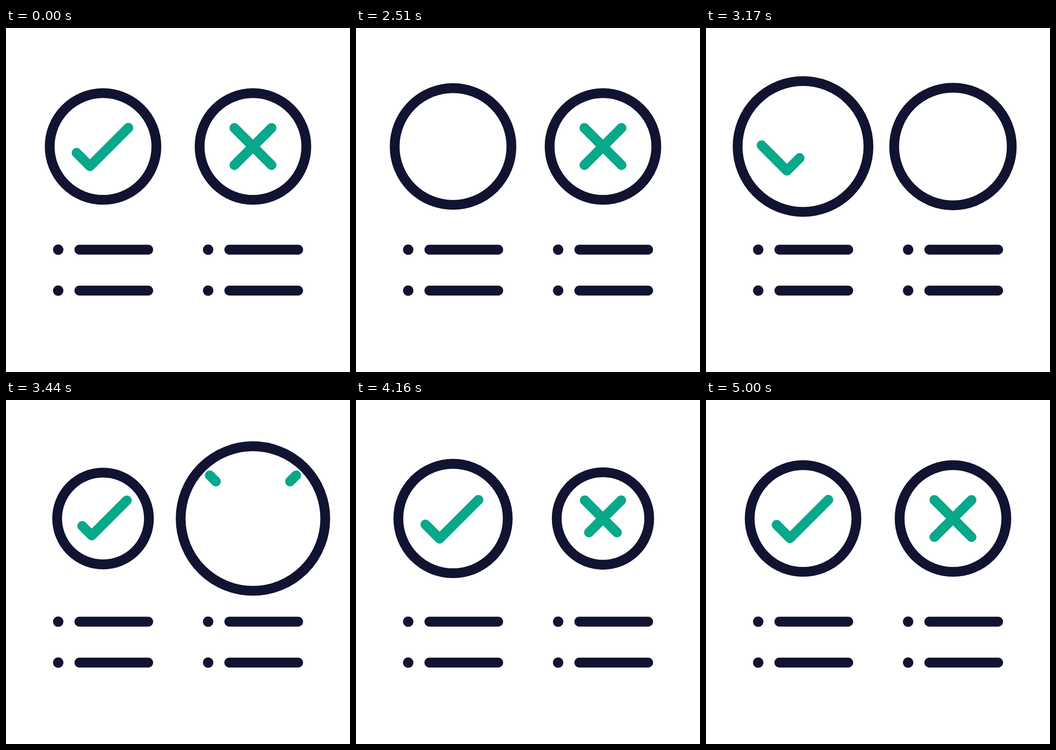
An HTML page with a canvas for the animation above (5030 ms loop, 748 by 748 pixels).

```html
<!DOCTYPE html>
<html>
<head>
<meta charset="utf-8">
<style>
html, body { margin: 0; width: 100%; height: 100%; overflow: hidden; background: #fff; }
canvas { display: block; }
</style>
</head>
<body>
<canvas id="stage" width="748" height="748"></canvas>
<script>
const ctx = document.getElementById('stage').getContext('2d');
const NAVY = '#121331', GREEN = '#08a88a';
const LOOP = 5030, START = 2000, STEP = 30;
const CY = 257.7, RADIUS = 116, ERASE = 335, ENTER = 735;

// Each icon: centre x, delay, scale peaks, mark length, overhang at both ends, last swing, strokes
const icons = [
  { x: 211, delay: 0, peak: 1.448, bounce: 1.065, len: 112.5, over: 16, swing: -3.2,
    strokes: [[[-73.5, -2.2], [-28.5, 42.8], [71.1, -56.8]]] },
  { x: 537, delay: 635, peak: 1.396, bounce: 1.073, len: 80.6, over: 29, swing: -8,
    strokes: [[[-69.3, 69.3], [69.3, -69.3]], [[69.3, 69.3], [-69.3, -69.3]]] }
];

// Keys are [time, value, bias]; sine easing between neighbours
function ease(keys, t) {
  if (t <= keys[0][0]) return keys[0][1];
  for (let i = 1; i < keys.length; i++) {
    const [t0, v0] = keys[i - 1], [t1, v1, bias = 1] = keys[i];
    if (t < t1) {
      const u = ((t - t0) / (t1 - t0)) ** bias;
      return v0 + (v1 - v0) * Math.sin(u * Math.PI / 2) ** 2;
    }
  }
  return keys[keys.length - 1][1];
}

function stroke(points, color) {
  ctx.strokeStyle = color;
  ctx.beginPath();
  points.forEach(([x, y]) => ctx.lineTo(x, y));
  ctx.stroke();
}

function dot(x, y) {
  ctx.fillStyle = NAVY;
  ctx.beginPath();
  ctx.arc(x, y, 11.3, 0, 7);
  ctx.fill();
}

// Visible part of the mark along its path, 0..len when at rest
function markSpan({ len, over, swing }, t) {
  if (t < ENTER) return [0, len * (1 - Math.max(t, 0) / ERASE)];
  const shift = ease([[ENTER, len + over], [1190, -62], [1460, 6], [1900, swing], [2330, 0]], t);
  return [Math.max(shift, -over), Math.min(shift + len, len + over)];
}

function drawIcon(icon, time) {
  const t = time - icon.delay;
  const s = ease([[0, 1], [250, 0.8], [960, icon.peak, 0.75], [1460, 0.858],
    [1960, icon.bounce], [2310, 1]], t);
  const [from, to] = markSpan(icon, t);

  ctx.save();
  ctx.translate(icon.x, CY);
  if (to > from) {
    const unit = s * Math.SQRT2;
    ctx.setLineDash([(to - from) * unit, 9999]);
    ctx.lineDashOffset = -(from + icon.over) * unit;
    for (const path of icon.strokes) stroke(path.map(([x, y]) => [x * s, y * s]), GREEN);
    ctx.setLineDash([]);
  }
  ctx.strokeStyle = NAVY;
  ctx.beginPath();
  ctx.arc(0, 0, RADIUS * s, 0, 7);
  ctx.stroke();
  ctx.restore();

  for (const y of [482, 571]) {
    dot(icon.x - 97.5, y);
    stroke([[icon.x - 51.5, y], [icon.x + 98.3, y]], NAVY);
  }
}

function frame(now) {
  const t = Math.floor((now % LOOP - START) / STEP) * STEP;
  ctx.fillStyle = '#fff';
  ctx.fillRect(0, 0, 748, 748);
  ctx.lineWidth = 21.3;
  ctx.lineCap = ctx.lineJoin = 'round';
  icons.forEach(icon => drawIcon(icon, Math.max(t, 0)));
  requestAnimationFrame(frame);
}
frame(0);
</script>
</body>
</html>
```
